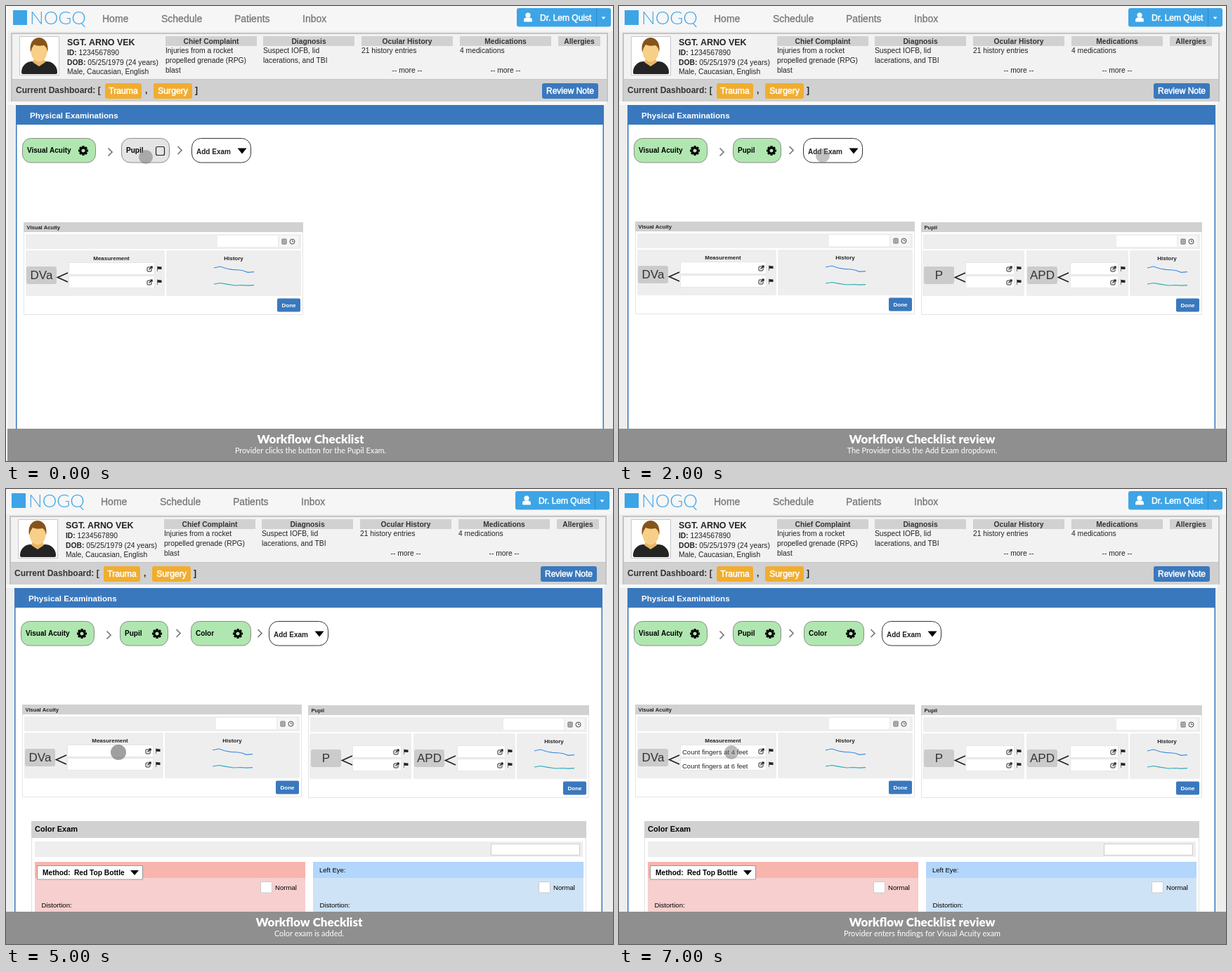
An HTML page with a canvas for the animation above (8 s loop, 864 by 648 pixels).

```html
<!DOCTYPE html>
<html lang="en">
<head>
<meta charset="utf-8">
<title>Workflow Checklist</title>
<style>
html, body { margin: 0; width: 100%; height: 100%; overflow: hidden; background: #fff; }
canvas { display: block; }
</style>
</head>
<body>
<canvas id="stage" width="864" height="648"></canvas>
<script>
const ctx = document.getElementById('stage').getContext('2d');
const SANS = '"Liberation Sans", Arial, sans-serif';
const LATO = 'Lato, sans-serif';
const BLUE = '#3a78bd', SKY = '#3da4e6', GREEN = '#b0e7b0', BAR = '#d1d1d1', PALE = '#eeeeee';
const STEP = 1000;

const scenes = [
  { title: 'Workflow Checklist', note: 'Provider clicks the button for the Pupil Exam.', dots: [[197, 215, 10, .55]] },
  { title: 'Workflow Checklist', note: 'Pupil exam is added.', pupil: 217, dots: [[197, 213, 10, .5]] },
  { title: 'Workflow Checklist review', note: 'The Provider clicks the Add Exam dropdown.', pupil: 217, dots: [[290, 213, 10, .45]] },
  { title: 'Workflow Checklist', note: 'The Provider is presented with a list of exams.', pupil: 215, menu: true, dots: [[290, 213, 10, .45]] },
  { title: 'Workflow Checklist', note: 'The Provider adds the Color Exam.', pupil: 215, menu: true, dots: [[298, 248, 10, .45]] },
  { title: 'Workflow Checklist', note: 'Color exam is added.', pupil: 215, color: true, dots: [[160, 375, 11, .7]] },
  { title: 'Workflow Checklist', note: 'Color exam is added.', pupil: 215, color: true, modal: true,
    dots: [[382, 396, 10, .5], [473, 405, 10, .6]] },
  { title: 'Workflow Checklist review', note: 'Provider enters findings for Visual Acuity exam', pupil: 215, color: true,
    findings: true, dots: [[160, 375, 10, .5]] }
];

const exams = ['Accommodation', 'Color Exam', 'Corneal Topography', 'Electrooculography',
  'Electroretinography', 'External Exam', 'Intraocular Pressure', 'Retinal Examination',
  'Retinal tomography', 'Stereopsis', 'Ultrasound', 'Vergence System'];

function text(str, x, y, size, { weight = 400, color = '#222', align = 'left', family = SANS, thick = 0 } = {}) {
  ctx.font = `${weight} ${size}px ${family}`;
  ctx.textAlign = align;
  ctx.fillStyle = color;
  ctx.fillText(str, x, y);
  if (thick) {
    ctx.strokeStyle = color;
    ctx.lineWidth = thick;
    ctx.strokeText(str, x, y);
  }
  return ctx.measureText(str).width;
}
const bold = (str, x, y, size, opts = {}) => text(str, x, y, size, { weight: 700, ...opts });
const centered = (str, x, y, size, opts = {}) => text(str, x, y, size, { align: 'center', ...opts });

function rect(x1, y1, x2, y2, fill) {
  ctx.fillStyle = fill;
  ctx.fillRect(x1, y1, x2 - x1, y2 - y1);
}
function box(x1, y1, x2, y2, r, fill, stroke, width = 1) {
  ctx.beginPath();
  ctx.roundRect(x1, y1, x2 - x1, y2 - y1, r);
  if (fill) { ctx.fillStyle = fill; ctx.fill(); }
  if (stroke) { ctx.strokeStyle = stroke; ctx.lineWidth = width; ctx.stroke(); }
}
function path(points, color, width) {
  ctx.beginPath();
  points.forEach(([x, y]) => ctx.lineTo(x, y));
  if (width) { ctx.strokeStyle = color; ctx.lineWidth = width; ctx.stroke(); }
  else { ctx.fillStyle = color; ctx.fill(); }
}
function disc(x, y, r, fill) {
  ctx.beginPath();
  ctx.arc(x, y, r, 0, Math.PI * 2);
  ctx.fillStyle = fill;
  ctx.fill();
}
function at(dx, dy, draw) {
  ctx.save();
  ctx.translate(dx, dy);
  draw();
  ctx.restore();
}
const down = (x, y, w, h, color = '#000') => path([[x - w / 2, y], [x + w / 2, y], [x, y + h]], color);
const chevron = (x, y) => path([[x, y], [x + 5.5, y + 5.5], [x, y + 11]], '#777', 1.7);
const lessThan = (x, y) => path([[x + 14.5, y - 6.5], [x, y], [x + 14.5, y + 6.5]], '#222', 1.7);

function gear(x, y) {
  at(x, y, () => {
    for (let i = 0; i < 8; i++) {
      ctx.rotate(Math.PI / 4);
      rect(-1.6, -7, 1.6, -4, '#000');
    }
    ctx.beginPath();
    ctx.arc(0, 0, 4, 0, Math.PI * 2);
    ctx.strokeStyle = '#000';
    ctx.lineWidth = 2.8;
    ctx.stroke();
  });
}
function editAndFlag(x, y) {
  box(x - 3.5, y - 2.5, x + 2.5, y + 3.5, 1, null, '#222', 1);
  path([[x - 1, y + 1], [x + 3.5, y - 3.5]], '#222', 1.2);
  path([[x + .5, y - 4], [x + 4.2, y - 4], [x + 4.2, y - .3]], '#222');
  rect(x + 10.5, y - 4, x + 11.2, y + 3.5, '#444');
  path([[x + 11.2, y - 3.5], [x + 17, y - 3], [x + 17, y + .5], [x + 11.2, y + .2]], '#222');
}
function dateIcons(x, y) {
  box(x - 3, y - 3.5, x + 3, y + 3.5, .5, null, '#555', .9);
  for (let i = -1; i < 2; i++) path([[x - 3, y + i * 1.8], [x + 3, y + i * 1.8]], '#555', .6);
  path([[x, y - 3], [x, y + 3]], '#555', .6);
  ctx.beginPath();
  ctx.arc(x + 11.5, y, 3.5, 0, Math.PI * 2);
  ctx.strokeStyle = '#444';
  ctx.lineWidth = 1;
  ctx.stroke();
  path([[x + 11.5, y - 2], [x + 11.5, y], [x + 13.5, y]], '#444', .8);
}
function button(x1, y1, x2, y2, label, size, base) {
  box(x1, y1, x2, y2, 2, BLUE);
  centered(label, (x1 + x2) / 2, base, size, { weight: 700, color: '#fff' });
}

function avatar() {
  box(17.5, 43.5, 73.5, 98.5, 0, '#fff', '#c8c8c8');
  ctx.save();
  ctx.beginPath();
  ctx.rect(18, 44, 55, 54);
  ctx.clip();
  box(20, 79, 71, 97, [15, 15, 2, 2], '#242424');
  path([[38, 75], [52, 75], [54, 80], [45, 86], [36, 80]], '#e9b568');
  ctx.beginPath();
  ctx.ellipse(45, 64.5, 11.5, 15, 0, 0, Math.PI * 2);
  ctx.fillStyle = '#f8cf86';
  ctx.fill();
  ctx.beginPath();
  ctx.moveTo(33, 66);
  ctx.bezierCurveTo(28, 38, 62, 38, 57, 66);
  ctx.quadraticCurveTo(56, 58, 52, 56);
  ctx.quadraticCurveTo(43, 58, 38, 55);
  ctx.quadraticCurveTo(34, 60, 33, 66);
  ctx.fillStyle = '#85541b';
  ctx.fill();
  ctx.restore();
}

function header() {
  rect(0, 0, 864, 36, '#f6f6f6');
  rect(0, 36, 864, 602, '#eeeeee');
  rect(8, 6, 28, 27, SKY);
  text('NOGQ', 32, 26, 26, { weight: 300, family: LATO, color: SKY });
  [['Home', 135], ['Schedule', 219], ['Patients', 323], ['Inbox', 420]]
    .forEach(([label, x]) => text(label, x, 23, 14, { color: '#777', thick: .3 }));

  box(725, 3, 859, 29.5, 3, SKY);
  rect(838, 3, 839, 29.5, '#2f8bcb');
  disc(741, 13, 3.6, '#fff');
  box(735, 16.5, 747, 22.5, [4, 4, 1, 1], '#fff');
  text('Dr. Lem Quist', 758, 21, 12, { color: '#fff', thick: .5 });
  down(848.5, 15.5, 6, 3.5, '#fff');
}

function patient() {
  rect(5, 38, 855, 136, '#c4c4c4');
  rect(7, 40, 853, 104, '#f2f2f2');
  rect(7, 105, 853, 136, '#d0d0d0');
  avatar();
  bold('SGT. ARNO VEK', 85, 56, 12.4);
  [['ID:', ' 1234567890'], ['DOB:', ' 05/25/1979 (24 years)'], ['', 'Male, Caucasian, English']]
    .forEach(([label, value], i) => {
      const y = 70 + i * 13.7;
      text(value, 85 + bold(label, 85, y, 10.3), y, 10.3);
    });

  const columns = [
    [225, 355, 'Chief Complaint', ['Injuries from a rocket', 'propelled grenade (RPG)', 'blast']],
    [364, 494, 'Diagnosis', ['Suspect IOFB, lid', 'lacerations, and TBI']],
    [504, 634, 'Ocular History', ['21 history entries'], true],
    [644, 774, 'Medications', ['4 medications'], true],
    [784, 844, 'Allergies', []]
  ];
  for (const [x1, x2, title, lines, more] of columns) {
    rect(x1, 43, x2, 57, BAR);
    centered(title, (x1 + x2) / 2, 53.5, 10.3, { weight: 700, color: '#333' });
    lines.forEach((line, i) => text(line, x1, 67 + i * 14, 10.3));
    if (more) centered('-- more --', (x1 + x2) / 2, 95, 10.3);
  }

  bold('Current Dashboard: [', 12, 124, 12, { color: '#333' });
  for (const [x1, x2, label] of [[139, 191, 'Trauma'], [208, 263, 'Surgery']]) {
    box(x1, 110, x2, 132, 3, '#f1ad2f');
    centered(label, (x1 + x2) / 2, 125, 12.2, { color: '#fff', thick: .5 });
  }
  bold(',', 196, 124, 12);
  bold(']', 267, 124, 12);
  box(761, 110, 841, 132, 3, BLUE);
  centered('Review Note', 801, 125, 12, { color: '#fff', thick: .5 });
}

function pill(x1, x2, label, gearX) {
  box(x1 + .5, 188.5, x2 - .5, 223, 12, gearX ? GREEN : '#e4e4e4', '#8c8c8c');
  bold(label, x1 + 7, 209, 10, { color: '#000' });
  if (gearX) gear(gearX, 206);
  else box(211.5, 200.5, 223.5, 212.5, 2, null, '#222', 1.2);
}
function addExam(x, open) {
  box(x + .5, 188.5, x + (open ? 103.5 : 84.5), open ? 441.5 : 223, 13, '#fff', '#333');
  bold('Add Exam', x + 7, 211, 10);
  down(x + 72, 202.5, 13, 8);
  if (open) exams.forEach((exam, i) => text(exam, x + 7, 233.7 + i * 17.73, 10.2));
}

function measure(x, label, inputX, inputEnd) {
  box(x, 370, x + 43, 395, 3, '#cbcbcb');
  centered(label, x + 21.5, 388, 17, { color: '#333' });
  lessThan(x + 44.5, 385.5);
  for (const y of [364, 383]) {
    box(inputX + .5, y + .5, inputEnd - .5, y + 17.5, 0, '#fff', '#e6e6e6');
    editAndFlag(inputEnd - 7.5, y + 9.5);
  }
}
function history(x1, x2, center, lineX) {
  box(x1, 347, x2, 412, 2, PALE);
  centered('History', center, 360.5, 8, { weight: 700 });
  path([[0, 372], [9, 370], [18, 373], [26, 374.3], [36, 375], [42, 376], [48, 378.3], [57, 377.7]]
    .map(([x, y]) => [x + lineX, y]), '#3e8ce0', 1.2);
  path([[0, 395], [9, 393.5], [18, 395.2], [30, 397], [40, 396.5], [48, 397.2], [57, 396.7]]
    .map(([x, y]) => [x + lineX, y]), '#2ba9b7', 1.2);
}
function examCard(x1, x2, title, inputX) {
  box(x1 + .5, 307.5, x2 - .5, 438.5, 0, '#fff', '#e4e4e4');
  rect(x1, 307, x2, 321, BAR);
  bold(title, x1 + 4.5, 317, 7.6);
  rect(x1 + 3, 324, x2 - 3, 345, PALE);
  rect(inputX, 326, inputX + 86, 342, '#fff');
  rect(inputX + 88, 326, inputX + 115, 342, '#f6f6f6');
  dateIcons(inputX + 95, 334.5);
  button(x2 - 37, 415.5, x2 - 4, 434.5, 'Done', 8, 428);
}
function acuityCard(findings) {
  examCard(23, 421, 'Visual Acuity', 299);
  box(26, 347, 224, 412, 2, PALE);
  centered('Measurement', 148, 360.5, 8, { weight: 700 });
  measure(27, 'DVa', 87, 210);
  history(226, 418, 322, 294);
  if (findings) [4, 6].forEach((feet, i) => text(`Count fingers at ${feet} feet`, 90, 378 + i * 19.5, 9.5));
}
function pupilCard() {
  examCard(430, 830, 'Pupil', 708);
  box(432, 347, 577, 412, 2, PALE);
  measure(434, 'P', 493, 563);
  box(580, 347, 725, 412, 2, PALE);
  measure(581, 'APD', 642, 711);
  history(727, 827, 780, 752);
}

function eye(x, head, body) {
  rect(x, 531, x + 385, 602, body);
  rect(x, 531, x + 385, 554, head);
  box(x + 321.5, 559.5, x + 337.5, 575, 0, '#fff', '#ccc');
  text('Normal', x + 342, 571, 9.6, { color: '#000' });
  text('Distortion:', x + 9.5, 596, 9.6, { color: '#000' });
}
function colorCard() {
  box(36.5, 473.5, 825.5, 610, 0, '#fff', '#e2e2e2');
  rect(36, 473, 826, 497, BAR);
  bold('Color Exam', 41, 488, 11, { color: '#000' });
  rect(41, 502, 821, 524, PALE);
  box(690.5, 505.5, 816.5, 521.5, 0, '#fff', '#ccc');
  eye(41, '#f7b5ae', '#f6cfce');
  eye(437, '#b2d6fc', '#cfe3f6');
  box(44.5, 536.5, 194.5, 556, 0, '#fff', '#999');
  bold('Method:', 52, 550, 10.2, { color: '#000' });
  bold('Red Top Bottle', 97, 550, 10.2, { color: '#000' });
  down(183, 543, 12, 7);
  text('Left Eye:', 446, 546, 9.5, { color: '#000' });
}

function option(x1, x2, row, label) {
  const y = 387.5 + row * 21.6;
  box(x1 + .5, y, x2 - .5, y + 17.5, 2.5, '#fff', '#cfcfcf');
  centered(label, (x1 + x2) / 2, y + 12, 8.8);
}
function modal() {
  ctx.save();
  ctx.shadowColor = 'rgba(0,0,0,.25)';
  ctx.shadowBlur = 3;
  box(144.5, 356.5, 614.5, 577.5, 0, '#fff');
  ctx.restore();
  box(144.5, 356.5, 614.5, 577.5, 0, null, '#999');
  path([[605.5, 361.5], [612, 368]], '#222', 1.5);
  path([[612, 361.5], [605.5, 368]], '#222', 1.5);
  [[149, 326, 'Chart Measurements (Snellen)'], [329, 503, 'Low Vision Measurements'], [506, 612, 'Correction']]
    .forEach(([x1, x2, title]) => {
      box(x1, 372, x2, 543, 2, '#f0f0f0');
      bold(title, x1 + 4, 381.5, 8.7);
    });

  [15, 20, 25, 30, 40, 50, 60].forEach((n, i) => option(153, 205, i, `20/${n}`));
  ['20/70', '20/80', '20/100', '20/200', '20/400', '< 20/400', '< 5/200'].forEach((s, i) => option(209, 261, i, s));
  for (let i = 0; i < 7; i++) option(270, 322, i, (i > 3 ? '+' : '') + (i - 3));

  option(333, 432, 0, 'Count Fingers');
  option(333, 432, 1, 'Hand Motion');
  option(333, 494, 2, 'Light Perception WITH Projection');
  option(333, 494, 3, 'Light Perception WITHOUT Projection');
  option(333, 432, 4, 'NO Light Perception');
  for (const y of [398, 419.5]) {
    text('at', 434.5, y + 3, 9);
    box(444.5, y - 9, 482, y + 9, 1, '#f7f7f7');
    rect(445, y - 9, 464, y + 9, '#fff');
    text('6', 447.5, y + 3.5, 9);
    down(472.5, y - 2.5, 5, -3.5, '#444');
    down(472.5, y + 4, 5, 3.5, '#444');
    text('feet', 483.5, y + 3, 9);
  }
  option(510, 609, 0, 'With Correction');
  option(510, 609, 1, 'Without Correction');
  rect(149, 546.5, 612, 547.5, '#777');
  bold('Input:', 149, 561, 8.7);
  button(573.5, 552, 613, 573, 'Finish', 8.3, 565.5);
}

function caption({ title, note }) {
  rect(0, 602, 864, 648, '#8f8f8f');
  const style = { color: '#fff', family: LATO };
  centered(title, 431.5, 623, 17, { ...style, weight: 900 });
  centered(note, 431.5, 637, 10.9, style);
}

function draw(index) {
  const scene = scenes[index];
  const first = index === 0;
  rect(0, 0, 864, 648, '#fff');
  // The opening view sits two pixels to the right.
  at(first ? 2 : 0, 0, () => {
    header();
    patient();
    rect(0, 136, 852, 141, '#f8f8f8');
    box(12.75, 141.75, 848.25, 620, 0, '#fff', BLUE, 1.5);
    rect(12, 141, 849, 169, BLUE);
    bold('Physical Examinations', 32, 160, 11.6, { color: '#fff' });

    at(0, first ? 1 : 0, () => acuityCard(scene.findings));
    if (scene.pupil) at(0, 1, pupilCard);
    if (scene.color) colorCard();

    pill(21, 126, 'Visual Acuity', 108);
    chevron(143.5, 202.5);
    pill(162, 231, 'Pupil', scene.pupil);
    chevron(242.5, 200);
    if (scene.color) {
      pill(263, 349, 'Color', 330);
      chevron(358.5, 200);
    }
    addExam(scene.color ? 374 : 262, scene.menu);
    if (scene.modal) modal();
    scene.dots.forEach(([x, y, r, alpha]) => disc(x, y, r, `rgba(120,120,120,${alpha})`));
    caption(scene);
  });
}

const start = performance.now();
function tick() {
  const elapsed = Math.max(0, performance.now() - start);
  draw(Math.floor(elapsed / STEP) % scenes.length);
  requestAnimationFrame(tick);
}
tick();
</script>
</body>
</html>
```
